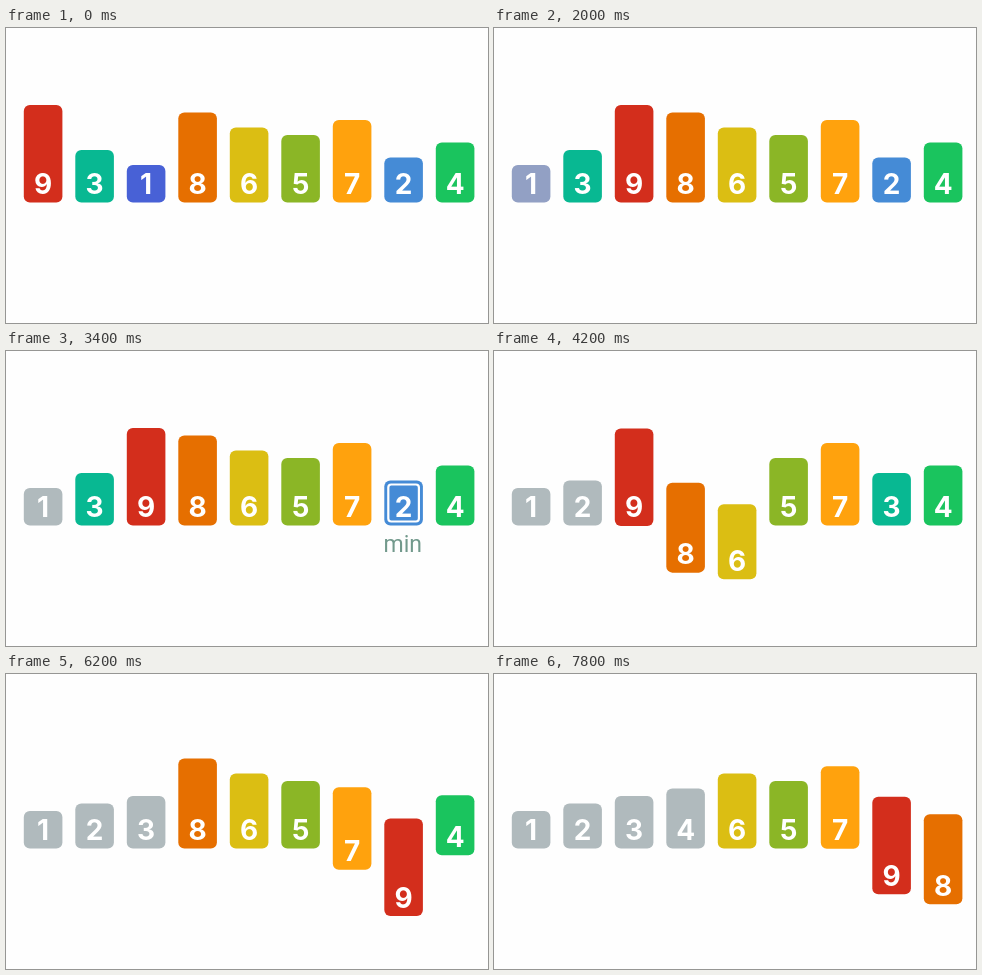
An HTML page with a canvas for the animation above (8 s loop, 482 by 295 pixels).

```html
<!DOCTYPE html>
<html lang="en">
<head>
<meta charset="utf-8">
<title>Selection sort</title>
<style>
  html, body { margin: 0; width: 100%; height: 100%; overflow: hidden; background: #fefefe; }
  canvas { display: block; }
</style>
</head>
<body>
<canvas id="stage" width="482" height="295"></canvas>
<script>
const ctx = document.getElementById('stage').getContext('2d');

const LOOP = 8000, STEP = 200;
const LEFT = 17.8, PITCH = 51.5, BAR_WIDTH = 38.6, FLOOR = 174.5;
const STAGGER = 118, FALL = 136, RISE = 206, DIP = 68, LIFT = 22, FADE = 450;
const VALUES = [9, 3, 1, 8, 6, 5, 7, 2, 4];
const GREY = [176, 186, 189];
const COLORS = {
  1: [72, 97, 214], 2: [69, 139, 214], 3: [8, 184, 146],
  4: [26, 196, 94], 5: [139, 182, 38], 6: [219, 190, 19],
  7: [255, 162, 13], 8: [230, 111, 0], 9: [211, 46, 28]
};

// Each pass scans the unsorted bars, marks the minimum, then swaps it forward.
const PASSES = [
  { scan: 255, swap: 1680, done: 1980 },
  { scan: 2015, swap: 3460, done: 3770 },
  { scan: 3869, swap: 5210, done: 5530 },
  { scan: 5582, swap: 6815, done: 7150 },
  { scan: 7230, swap: 8400, done: 8700 }
];

const clamp = x => Math.min(1, Math.max(0, x));
const smooth = x => x * x * (3 - 2 * x);
const swell = x => Math.sin(clamp(x) * Math.PI / 2) ** 2;
const dip = t => DIP * (t < FALL ? swell(t / FALL) : swell(1 - (t - FALL) / RISE));

function barsAt(time) {
  const bars = VALUES.map((value, slot) => ({ value, slot, dy: 0, fade: 0, marked: false, front: 0 }));
  PASSES.forEach((pass, first) => {
    if (time < pass.scan) return;
    const unsorted = bars.filter(bar => bar.slot >= first);
    const min = unsorted.reduce((a, b) => a.value < b.value ? a : b);
    const head = unsorted.find(bar => bar.slot === first);
    const scanEnd = pass.scan + (VALUES.length - 1 - first) * STAGGER + FALL + RISE;

    if (time < scanEnd) {
      for (const bar of unsorted) bar.dy = dip(time - pass.scan - (bar.slot - first) * STAGGER);
    } else if (time < pass.swap) {
      min.marked = true;
    } else {
      const progress = clamp((time - pass.swap) / (pass.done - pass.swap));
      const shift = (min.slot - head.slot) * smooth(progress);
      const arc = progress < 1 ? LIFT * Math.sin(Math.PI * progress) : 0;
      head.slot += shift;
      min.slot -= shift;
      head.dy = -arc;
      min.dy = arc;
      min.front = head.front = progress < 1 ? 1 : 0;
      min.fade = clamp((time - pass.swap) / FADE);
    }
  });
  return bars.sort((a, b) => a.front - b.front);
}

function roundRect(x, y, w, h, r) {
  ctx.beginPath();
  ctx.roundRect(x, y, w, h, r);
}

function drawBar({ value, slot, dy, fade, marked }) {
  const x = LEFT + slot * PITCH, center = x + BAR_WIDTH / 2;
  const height = 30 + 7.5 * value, top = FLOOR - height + dy;
  const color = COLORS[value].map((c, i) => Math.round(c + (GREY[i] - c) * fade));

  ctx.fillStyle = `rgb(${color})`;
  roundRect(x, top, BAR_WIDTH, height, 6);
  ctx.fill();

  if (marked) {
    ctx.strokeStyle = '#fff';
    ctx.lineWidth = 2.2;
    roundRect(x + 4, top + 4, BAR_WIDTH - 8, height - 8, 3);
    ctx.stroke();
    ctx.fillStyle = '#72998c';
    ctx.font = '23px Roboto, sans-serif';
    ctx.fillText('min', center - 0.8, 201);
  }

  ctx.fillStyle = '#fff';
  ctx.font = '700 28px Inter, sans-serif';
  ctx.fillText(value, center, 166 + dy);
}

function render(now) {
  const time = Math.floor(now % LOOP / STEP) * STEP;
  ctx.fillStyle = '#fefefe';
  ctx.fillRect(0, 0, 482, 295);
  ctx.textAlign = 'center';
  barsAt(time).forEach(drawBar);
}

let start;
function tick(now) {
  start ??= now;
  render(now - start);
  requestAnimationFrame(tick);
}
requestAnimationFrame(tick);
</script>
</body>
</html>
```
